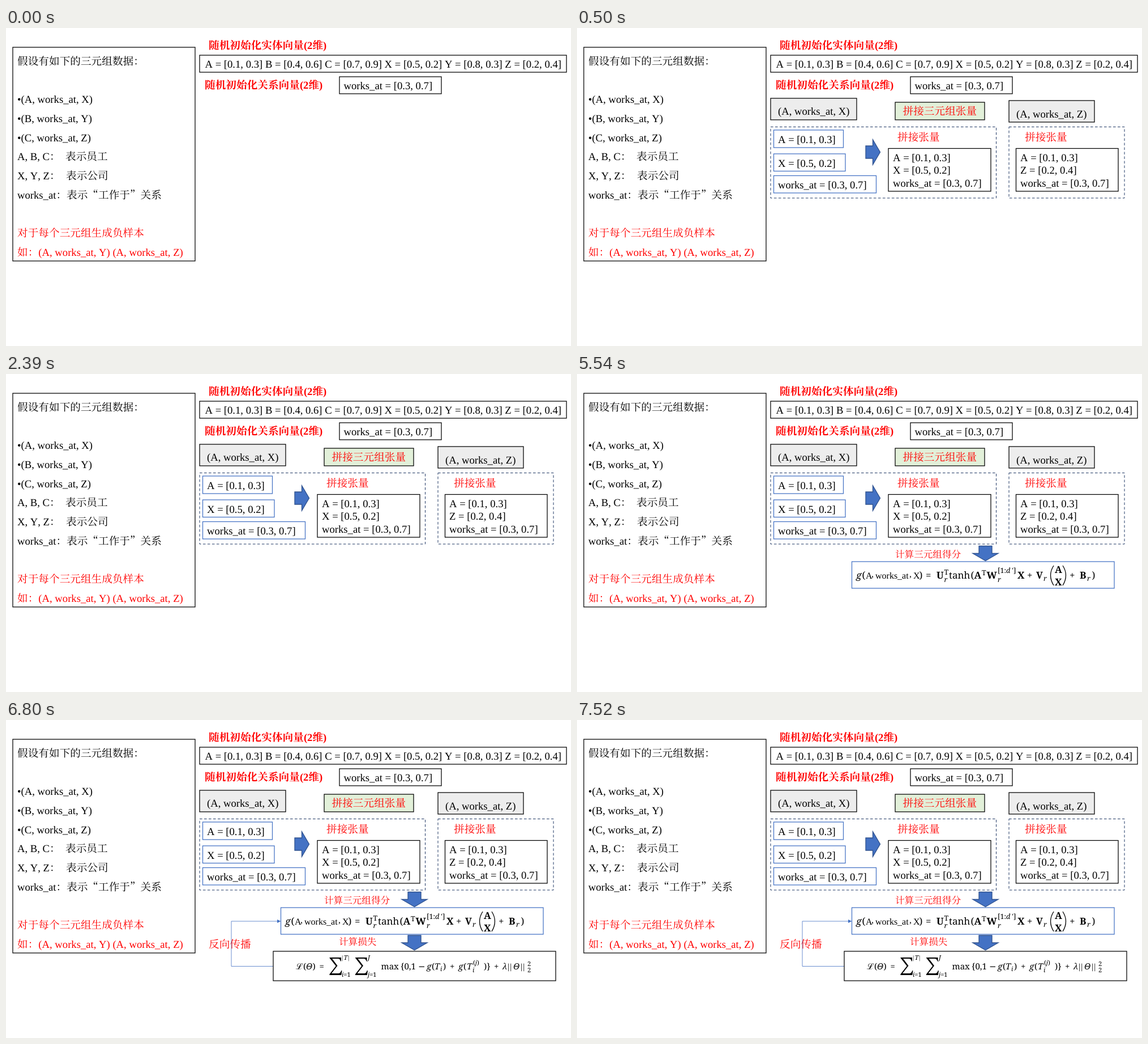
Recreate the animation shown at these times as an HTML page. Size 998 px wide and 561 px high, loop 8000 ms.

```html
<!DOCTYPE html>
<html lang="zh-CN">
<head>
<meta charset="utf-8">
<title>三元组打分</title>
<style>
  html, body { margin: 0; width: 100%; height: 100%; overflow: hidden; background: #fff; }
  svg { display: block; width: 998px; height: 561px; }
  text {
    font: 18.67px "Liberation Serif", "Noto Serif CJK SC", "Noto Sans CJK SC", serif;
    font-kerning: none; text-rendering: geometricPrecision; white-space: pre;
  }
  .cjk { font-family: "Noto Serif CJK SC", "Noto Sans CJK SC", serif; }
  .red { fill: #f00; }
  .bold { font-weight: 700; }
  .medium { font-weight: 500; }
  .small { font-size: 16.6px; }
  .arg { font-size: 16px; }
  .math { font-family: "Noto Serif", "DejaVu Serif", "DejaVu Sans", serif; font-size: 17px; }
  .loss { font-size: 15px; }
  .script { font-size: 12.5px; }
  .tiny { font-size: 11px; }
  .it { font-style: italic; }
  .bar { font-family: "Liberation Serif", serif; letter-spacing: 1.3px; }
</style>
</head>
<body>
<svg id="stage" viewBox="0 0 998 561"></svg>
<script>
const BLUE = '#4472c4', NAVY = '#203864';

const text = (x, y, s, cls = '') => `<text x="${x}" y="${y}" class="${cls}">${s}</text>`;
const lines = (x, y, step, rows) => rows.map((s, i) => text(x, y + i * step, s)).join('');
const box = (x1, y1, x2, y2, stroke = '#000', fill = 'none', extra = 'stroke-width="1.25"') =>
  `<rect x="${x1}" y="${y1}" width="${x2 - x1}" height="${y2 - y1}" fill="${fill}" stroke="${stroke}" ${extra}/>`;
const dashed = (...r) => box(...r, NAVY, 'none', 'stroke-dasharray="4.6 3.4"');
const path = (d, stroke, width = 1, fill = 'none') =>
  `<path d="${d}" fill="${fill}" stroke="${stroke}" stroke-width="${width}"/>`;
const arrow = d => path(d, '#2f528f', 1.3, BLUE);
const downArrow = y => arrow(`M710 ${y}h23v13h11l-22.5 13l-22.5-13h11z`);
const it = s => `<tspan class="it">${s}</tspan>`;

// Formula pieces: [x, text, classes, baseline shift]
const formula = (y, cls, parts) =>
  parts.map(([x, s, c = '', dy = 0]) => text(x, y + dy, s, `math ${cls} ${c}`)).join('');
const sum = x => path(`M${x} 419h20.5v6.5h-1.2q-.6-4.5-4.5-4.5h-10.3l9.5 12.5l-10.5 13.5h12q4 0 5.2-5h1.2l-1 8h-21v-1.6l11.3-14.4l-11.2-14.2z`, 'none', 0, '#000');

const setup =
  box(12, 34, 334, 411) +
  text(20, 65, '假设有如下的三元组数据：', 'medium') +
  lines(20, 132.3, 33.65, ['•(A, works_at, X)', '•(B, works_at, Y)', '•(C, works_at, Z)',
    'A, B, C：', 'X, Y, Z：', 'works_at：']) +
  text(105, 233.3, '表示员工') + text(106, 266.9, '表示公司') +
  text(107, 300.6, '表示“工作于”关系', 'cjk') +
  text(20, 367.9, '对于每个三元组生成负样本', 'red') +
  text(20, 401.5, '如：(A, works_at, Y) (A, works_at, Z)', 'red') +
  text(358, 37, '随机初始化实体向量(2维)', 'red bold') +
  box(342, 48, 990, 78) +
  text(351.5, 70, 'A = [0.1, 0.3] B = [0.4, 0.6] C = [0.7, 0.9] X = [0.5, 0.2] Y = [0.8, 0.3] Z = [0.2, 0.4]') +
  text(351, 107, '随机初始化关系向量(2维)', 'red bold') +
  box(589, 86, 769, 116) + text(596.5, 108, 'works_at = [0.3, 0.7]');

const concat =
  box(342, 124, 494, 162, '#000', '#ededed') + text(355, 153, '(A, works_at, X)') +
  box(562, 131, 720, 162, '#000', '#e2f0d9') + text(575.5, 153, '拼接三元组张量', 'red medium') +
  box(763, 128, 914, 166, '#000', '#ededed') + text(776, 158, '(A, works_at, Z)') +
  dashed(342, 174.5, 740.5, 300) + dashed(763, 174.5, 967, 300) +
  box(347.5, 180, 470.5, 211, BLUE) + text(355, 203, 'A = [0.1, 0.3]') +
  box(347.5, 222, 474, 252.5, BLUE) + text(355, 244.5, 'X = [0.5, 0.2]') +
  box(347.5, 260.5, 528.5, 291, BLUE) + text(355, 283, 'works_at = [0.3, 0.7]') +
  arrow('M510 208h12.5v-11l13 22l-13 22v-11h-12.5z') +
  text(566, 199, '拼接张量', 'red medium') + text(791, 199, '拼接张量', 'red medium') +
  box(550, 212.5, 731, 288) +
  lines(558, 235, 22.3, ['A = [0.1, 0.3]', 'X = [0.5, 0.2]', 'works_at = [0.3, 0.7]']) +
  box(775.5, 212.5, 956, 288) +
  lines(783, 235, 22.3, ['A = [0.1, 0.3]', 'Z = [0.2, 0.4]', 'works_at = [0.3, 0.7]']);

const score =
  text(562, 324, '计算三元组得分', 'red small') + downArrow(303.5) +
  box(485.5, 331, 949, 378, BLUE) +
  text(510, 361, 'A', 'arg') + text(520, 358, ',', 'arg') + text(527, 361, 'works_at', 'arg') +
  text(587, 358, ',', 'arg') + text(594, 361, 'X', 'arg') +
  formula(361, '', [
    [493, 'g', 'it'], [503.5, '('], [604.5, ')'], [616, '='],
    [635, 'U', 'bold'], [648.5, 'T', 'script', -7], [648.5, 'r', 'script it', 6],
    [657, 'tanh'], [695.5, '('], [701.5, 'A', 'bold'], [715, 'T', 'script', -6],
    [723.5, 'W', 'bold'], [743, `[1:${it('d')} ′]`, 'script', -10],
    [743, 'r', 'script it', 6], [778, 'X', 'bold'], [795, '+'],
    [811, 'V', 'bold'], [824, 'r', 'script it', 4],
    [844, 'A', 'bold', -10], [844, 'X', 'bold', 12], [870, '+'],
    [888, 'B', 'bold'], [901, 'r', 'script it', 4], [909.5, ')']
  ]) +
  path('M842 338q-11 17 0 35M858 338q11 17 0 35', '#000', 1.3);

const loss =
  text(588, 396.5, '计算损失', 'red small') + downArrow(380) +
  text(358, 402, '反向传播', 'red') +
  path('M472 434.5H398V355H480', BLUE, 0.8) + path('M479 352l6.5 3l-6.5 3z', 'none', 0, BLUE) +
  box(472, 408, 971, 460) + sum(571.5) + sum(617) +
  formula(440, 'loss', [
    [512, 'ℒ'], [525, '('], [530, 'Θ', 'it'], [541.5, ')'], [553.5, '='],
    [593, '|', 'tiny bar', -17], [596.5, 'T', 'tiny it', -17], [604, '|', 'tiny bar', -17],
    [593, `${it('i')}=1`, 'tiny', 13],
    [639, 'J', 'tiny it', -17], [639, `${it('j')}=1`, 'tiny', 13],
    [662.5, 'max'], [697, '{0,1'], [728, '−'], [743, 'g', 'it'], [752, '('], [757, 'T', 'it'],
    [767, 'i', 'tiny it', 3], [772, ')'], [784, '+'],
    [799, 'g', 'it'], [808, '('], [814, 'T', 'it'],
    [825, `(${it('j')})`, 'tiny', -8], [824, 'i', 'tiny it', 5],
    [844, ')}'], [862, '+'], [877, 'λ', 'it'], [886, '||', 'bar'], [896, 'Θ', 'it'], [909, '||', 'bar'],
    [921, '2', 'tiny', -6], [921, '2', 'tiny', 5]
  ]);

const steps = [[0, setup], [500, concat], [3650, score], [6800, loss]];
const stage = document.getElementById('stage');
stage.innerHTML = steps.map(([, art]) => `<g>${art}</g>`).join('');

const LOOP = 8000, start = performance.now();
function draw(now) {
  const t = Math.max(0, now - start) % LOOP;
  steps.forEach(([from], i) => {
    stage.children[i].style.display = t >= from ? '' : 'none';
  });
  requestAnimationFrame(draw);
}
draw(start);
</script>
</body>
</html>
```
